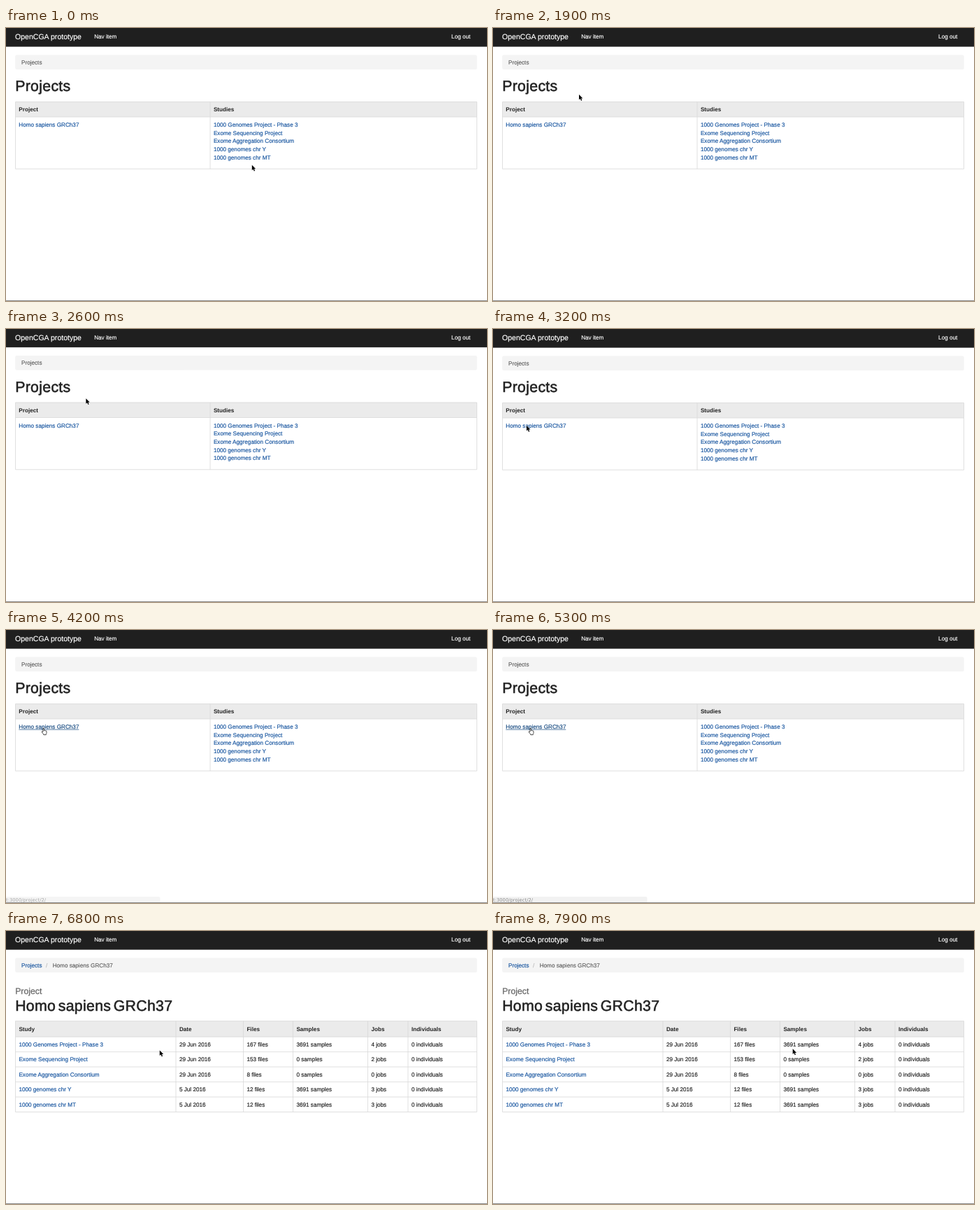
These frames come from a looping animation (688 px wide and 390 px high, 8000 ms). An HTML page:

```html
<!DOCTYPE html>
<html lang="en">
<head>
<meta charset="utf-8">
<title>Projects</title>
<style>
  html, body { margin: 0; width: 100%; height: 100%; overflow: hidden; background: #fff; }
  svg { display: block; width: 688px; height: 390px; }
  text {
    font: 8.167px "Liberation Sans", Arial, sans-serif;
    color: #222; fill: currentColor; stroke: currentColor; stroke-width: .17px;
    white-space: pre; text-rendering: geometricPrecision;
  }
  .nav { color: #fff; }
  .brand { font-size: 10.55px; color: #fff; }
  .h1 { font-size: 21.3px; stroke-width: .55px; letter-spacing: .3px; word-spacing: -2.7px; }
  .sub { font-size: 12.25px; color: #666; stroke-width: .25px; }
  .th { font-weight: bold; stroke-width: 0; }
  .a { color: #17559f; }
  .a.hover { color: #174a80; }
  .crumb { color: #555; stroke-width: .1px; }
  .slash { color: #bbb; }
  .url { font: 6.8px "DejaVu Sans", sans-serif; color: #8c8c8c; stroke-width: 0; }
</style>
</head>
<body>
<svg viewBox="0 0 688 390">
  <g id="page">
    <g id="chrome"></g>
    <g id="list"></g>
    <g id="detail"></g>
  </g>
  <g id="bubble">
    <path d="M0 381H218.5Q220.5 381 220.5 383V389H0Z" fill="#f2f2f2"/>
    <text class="url" x="0" y="388.4">t:3000/project/2/</text>
  </g>
  <rect y="389" width="688" height="1" fill="#8a8a8a"/>
  <path id="arrow" d="M0 0V7.6L1.8 6 3 8.9 4.3 8.3 3.1 5.6H5.4Z" stroke="#fff" stroke-width=".8" paint-order="stroke"/>
  <path id="hand" d="M2 5.4V1.1a.7.7 0 0 1 1.5 0V3.6q.8-.5 1.2.2 .8-.4 1.2.3 1-.2 1.1.8v2q0 1-.7 1.7V9.7H2.8V9Q1.4 7.5 0 5.4q.7-1.1 2 0z" fill="#fff" stroke="#111" stroke-width=".75"/>
</svg>
<script>
const $ = id => document.getElementById(id);
const NS = 'http://www.w3.org/2000/svg';

function add(parent, tag, attrs, content) {
  const el = document.createElementNS(NS, tag);
  for (const k in attrs) el.setAttribute(k, attrs[k]);
  if (content) el.textContent = content;
  return parent.appendChild(el);
}
const label = (g, x, y, s, cls = '') => add(g, 'text', { x, y, class: cls }, s);
const box = (g, x, y, width, height, fill, rx = 0) =>
  add(g, 'rect', { x, y, width, height, fill, rx });

// Grid of a table: the first two ys bound the header row.
function grid(g, xs, ys) {
  const left = xs[0], right = xs.at(-1), top = ys[0], bottom = ys.at(-1);
  box(g, left, top, right - left, ys[1] - top, '#ebebeb');
  const d = xs.map(x => `M${x} ${top}V${bottom}`).join('') +
    ys.map(y => `M${left} ${y}H${right}`).join('');
  add(g, 'path', { d, stroke: '#d9d9d9', 'stroke-width': .8, fill: 'none' });
}

const species = 'Homo sapiens GRCh37';
const studies = ['1000 Genomes Project - Phase 3', 'Exome Sequencing Project',
  'Exome Aggregation Consortium', '1000 genomes chr Y', '1000 genomes chr MT'];

const chrome = $('chrome');
box(chrome, 0, 0, 688, 26.7, '#1f1f1f');
label(chrome, 13, 16, 'OpenCGA prototype', 'brand');
label(chrome, 126.2, 15.2, 'Nav item', 'nav');
label(chrome, 637.1, 15.2, 'Log out', 'nav');
box(chrome, 13.2, 38.5, 660.5, 20.8, '#f4f4f4', 2.3);

const list = $('list');
label(list, 22, 51.5, 'Projects', 'crumb');
label(list, 13.2, 90.2, 'Projects', 'h1');
grid(list, [13.5, 292, 673.5], [105.5, 127, 201.3]);
label(list, 18.3, 119, 'Project', 'th');
label(list, 296.9, 119, 'Studies', 'th');
const link = label(list, 18.3, 141, species, 'a');
const line = box(list, 18.3, 141.8, 86, .7, '#174a80');
studies.forEach((s, i) => label(list, 296.9, 141 + i * 11.667, s, 'a'));

const detail = $('detail');
label(detail, 22, 51.5, 'Projects', 'a');
label(detail, 57, 51.5, '/', 'slash');
label(detail, 66.7, 51.5, species, 'crumb');
label(detail, 13.2, 90.2, 'Project', 'sub');
label(detail, 13.2, 114, species, 'h1');

const pitch = 21.47;
const edges = [13.5, 243, 339.5, 410.5, 517.5, 575, 673.5];
grid(detail, edges, [128.7, ...[0, 1, 2, 3, 4, 5].map(i => 151.2 + i * pitch)]);
const row = (i, day, files, samples, jobs) => [studies[i], day + ' 2016', files + ' files',
  samples + ' samples', jobs + ' jobs', '0 individuals'];
[
  ['Study', 'Date', 'Files', 'Samples', 'Jobs', 'Individuals'],
  row(0, '29 Jun', 167, 3691, 4),
  row(1, '29 Jun', 153, 0, 2),
  row(2, '29 Jun', 8, 0, 0),
  row(3, '5 Jul', 12, 3691, 3),
  row(4, '5 Jul', 12, 3691, 3)
].forEach((cells, r) => cells.forEach((s, c) =>
  label(detail, edges[c] + 4.9, r ? 165 + (r - 1) * pitch : 143, s, r ? (c ? '' : 'a') : 'th')));

// Pointer moves: start ms, end ms, end point, sag of the path.
const moves = [
  [1000, 1700, 78, 72, -8],
  [1700, 1900, 123, 95, 0],
  [2500, 3000, 40, 135.5, 0],
  [3000, 3200, 48, 138, 0],
  [3600, 4000, 54, 140.5, 0],
  [6200, 7500, 428.7, 168.3, 18]
];
const ramp = (t, a, b) => Math.min(1, Math.max(0, (t - a) / (b - a)));

function pointer(t) {
  let x = 351.8, y = 195.7;
  for (const [a, b, toX, toY, sag] of moves) {
    const p = ramp(t, a, b), e = p * p * (3 - 2 * p);
    x += (toX - x) * e;
    y += (toY - y) * e + sag * Math.sin(Math.PI * e);
  }
  return [x, y];
}
// A short wheel nudge that springs back.
const scroll = t => t < 2200 || t > 2700 ? 0 : 4 * 0.5 ** (Math.abs(t - 2300) / 100);

const show = (el, on) => { el.style.display = on ? '' : 'none'; };
const place = (el, x, y) => el.setAttribute('transform', `translate(${x} ${y})`);

function draw(ms) {
  const t = Math.floor(ms % 8000 / 100) * 100;
  const [x, y] = pointer(t);
  const opened = t >= 5400;
  const hover = t >= 3900 && !opened;
  const hand = t >= 3900 && t < 6500;
  show(list, !opened);
  show(detail, opened);
  show(line, hover);
  link.classList.toggle('hover', hover);
  show($('arrow'), !hand);
  show($('hand'), hand);
  place($('arrow'), x, y);
  place($('hand'), x - 3, y - .5);
  place($('page'), 0, -scroll(t));
  $('bubble').style.opacity = ramp(t, 3900, 4300) - ramp(t, 5700, 6000);
}

const start = performance.now();
function tick() {
  draw(performance.now() - start);
  requestAnimationFrame(tick);
}
tick();
</script>
</body>
</html>
```
